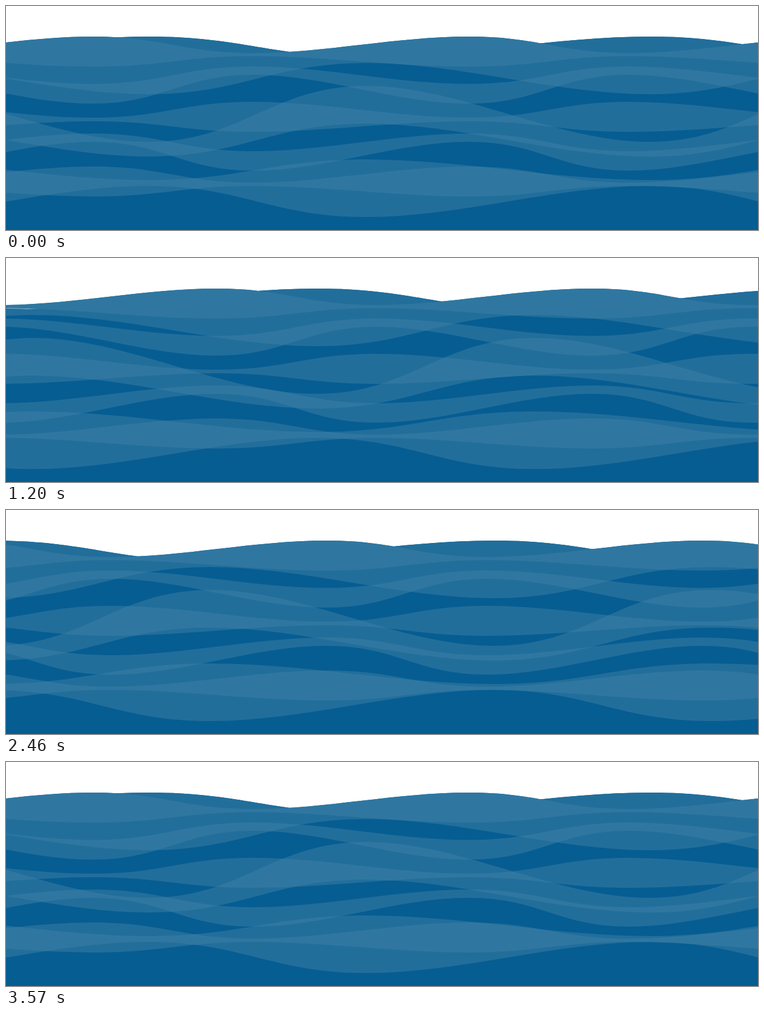
An HTML page with a canvas for the animation above (3600 ms loop, 1280 by 381 pixels).

```html
<!DOCTYPE html>
<html lang="en">
<head>
<meta charset="utf-8">
<title>Waves</title>
<style>
  html, body { margin: 0; width: 100%; height: 100%; overflow: hidden; background: #fff; }
  canvas { display: block; width: 1280px; height: 381px; }
</style>
</head>
<body>
<canvas id="stage" width="1280" height="381"></canvas>
<script>
const WIDTH = 1280, HEIGHT = 381;
const LOOP = 3600, STEP = 30, LAST = LOOP / STEP - 1;
const DARK = '#065d92', MID = '#226e9b', LIGHT = '#2f77a1';
const ctx = document.getElementById('stage').getContext('2d');

// Each band: top edge at crest and trough, then bottom edge at crest and trough.
const front = {
  period: 640, fall: 274, handle: 122, start: 147, travel: -1280,
  bands: [
    [52, 80, 103, 85.2],
    [132.5, 103, 166, 117],
    [190, 163, 196, 214],
    [217, 247, 231, 280],
    [273, 300.5, 324, 306]
  ]
};
const back = {
  period: WIDTH * 2 / 3, fall: 371, handle: 160, start: 242, travel: WIDTH * 2 / 3,
  bands: [
    [52, 86.8, 150, 97],
    [231, 136, 256, 200],
    [296, 261, 306, 359]
  ]
};

// Alternating crest and trough positions that span the stage.
function anchorsOf(layer, progress) {
  const { period, fall, start, travel } = layer;
  const offset = (((start + travel * progress) % period) + period) % period;
  const anchors = [];
  for (let x = offset - 2 * period; x < WIDTH + period; x += period) {
    anchors.push({ x, crest: true }, { x: x + fall, crest: false });
  }
  return anchors;
}

function traceEdge(path, anchors, crestY, troughY, handle) {
  const dir = Math.sign(anchors[1].x - anchors[0].x) * handle;
  const yOf = a => a.crest ? crestY : troughY;
  path.lineTo(anchors[0].x, yOf(anchors[0]));
  for (let i = 1; i < anchors.length; i++) {
    const a = anchors[i - 1], b = anchors[i];
    path.bezierCurveTo(a.x + dir, yOf(a), b.x - dir, yOf(b), b.x, yOf(b));
  }
}

function bandsPath(layer, anchors, bands) {
  const path = new Path2D();
  const reversed = [...anchors].reverse();
  for (const [topCrest, topTrough, lowCrest, lowTrough] of bands) {
    const band = new Path2D();
    traceEdge(band, anchors, topCrest, topTrough, layer.handle);
    traceEdge(band, reversed, lowCrest, lowTrough, layer.handle);
    band.closePath();
    path.addPath(band);
  }
  return path;
}

function fill(path, color) {
  ctx.fillStyle = color;
  ctx.fill(path);
}

function draw(progress) {
  const backAnchors = anchorsOf(back, progress);
  const [[crest, trough, lowCrest, lowTrough], ...lower] = back.bands;
  const backPath = bands => bandsPath(back, backAnchors, bands);
  const frontPath = bandsPath(front, anchorsOf(front, progress), front.bands);

  ctx.fillStyle = '#fff';
  ctx.fillRect(0, 0, WIDTH, HEIGHT);
  fill(backPath([[crest, trough, HEIGHT, HEIGHT]]), DARK);
  fill(backPath(back.bands), MID);
  fill(frontPath, MID);

  // Overlaps, and front crests rising above the back layer, are lighter.
  ctx.save();
  ctx.clip(backPath([[0, 0, lowCrest, lowTrough], ...lower]));
  fill(frontPath, LIGHT);
  ctx.restore();
}

function tick() {
  draw(Math.floor((performance.now() % LOOP) / STEP) / LAST);
  requestAnimationFrame(tick);
}
tick();
</script>
</body>
</html>
```
